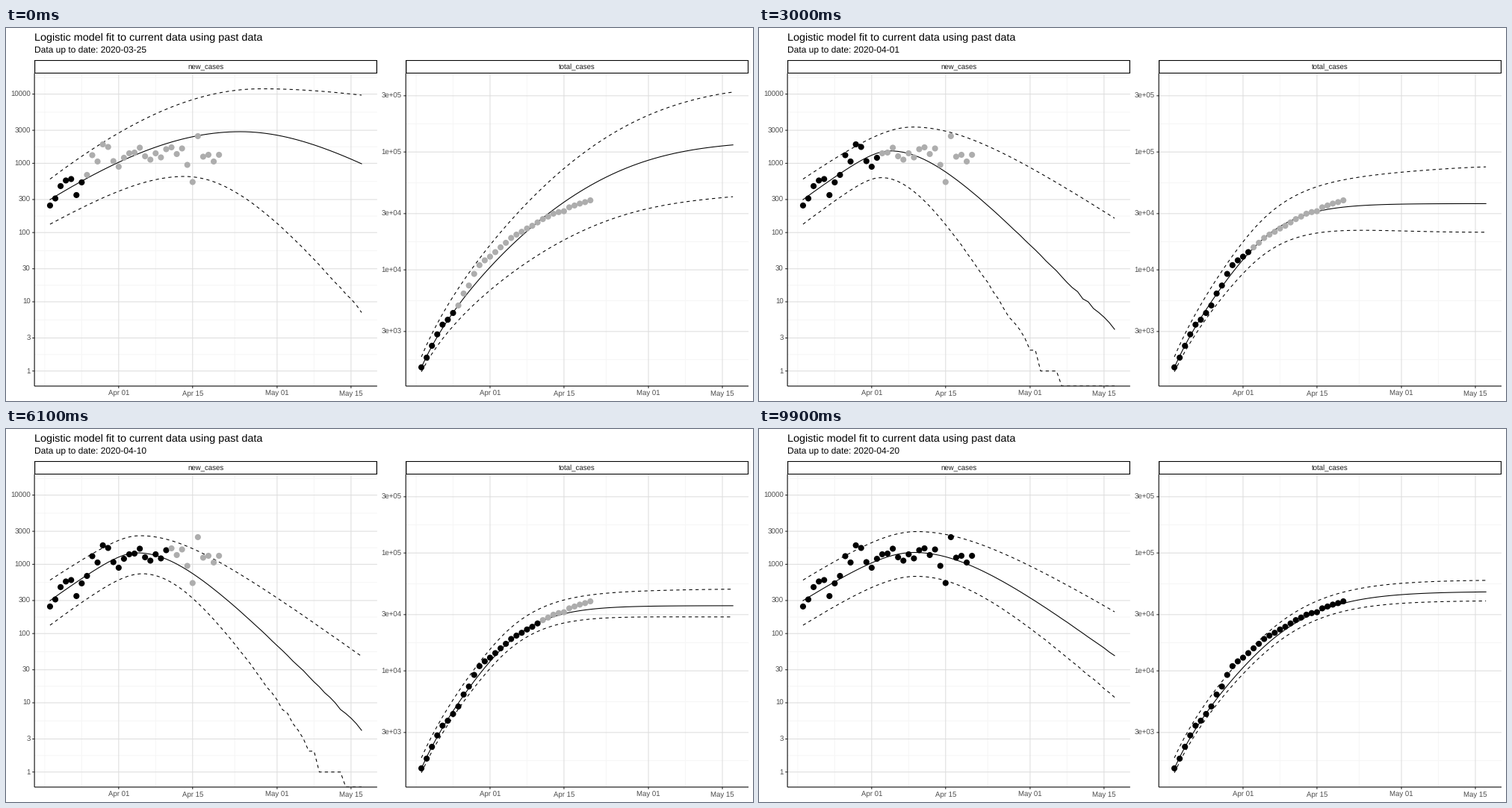
A matplotlib script that plays this animation: 1000 px wide and 500 px high, repeating every 10000 ms.

```python
import math
import numpy as np
import matplotlib.pyplot as plt
from matplotlib.animation import FuncAnimation
from matplotlib.patches import Rectangle

W, H, DPI = 1000, 500, 100
FRAMES, INTERVAL = 100, 100
STATES = 27
PT = 72 / DPI                      # points per pixel
LINE = 1.07

LEFT, WIDTH, PANEL_DX = 38.09, 458.77, 497.13
STRIP, TOP, BOTTOM = 43, 61, 480
DAYS = np.arange(60)
LAST = DAYS[-1]
DAY0 = LEFT + WIDTH / 22           # 5 % margin on both sides of the data
DAY_W = WIDTH / 1.1 / LAST

plt.rcParams.update({"font.family": "Liberation Sans", "text.hinting": "none",
                     "path.snap": False})

CASES = np.array([
    246, 311, 469, 565, 593, 348, 531, 680, 1312, 1063, 1880,
    1724, 1076, 893, 1203, 1396, 1431, 1682, 1264, 1130, 1396, 1218,
    1600, 1702, 1362, 1640, 950, 537, 2470, 1248, 1328, 1063, 1328])
FIRST_TOTAL = 1490
TOTALS = FIRST_TOTAL + np.cumsum(CASES) - CASES[0]

# Per key state: peak day, peak height and last height of each new-case curve
KEYS = [0, 4, 6, 10, 16, 20, 26]
MID = [(36, 139, 182), (21.5, 145.5, 330), (17.5, 159.5, 381), (15.5, 170, 430),
       (16.5, 166, 403), (18, 164.5, 363), (21, 165.5, 304)]
HIGH = [(40, 81.5, 90), (28, 105, 190), (23, 124.5, 237), (18.5, 141, 273),
        (17, 143, 305), (19.5, 142, 292), (21.5, 137.5, 245)]
LOW = [(25.5, 199, 381), (18.3, 187, 522), (15.3, 199, 595), (14.3, 202, 630),
       (17.5, 194, 530), (18.5, 193, 444), (21.5, 197.5, 360)]


def new_y(v):
    return 459.8 - 92.8 * np.log10(v)


def new_value(y):
    return 10 ** ((459.8 - y) / 92.8)


def tot_y(v):
    return 324.2 - 158 * (np.log10(v) - 4)


def day_x(d, dx):
    return DAY0 + DAY_W * np.asarray(d) + dx


def hump(state, keys, start):
    """Hyperbolic rise from a fixed start to a peak, then a fall to the end."""
    day, peak, end = (np.interp(state, KEYS, c) for c in zip(*keys))
    w = (day / 36) ** 1.5          # slow outbreaks have rounder peaks
    before = DAYS < day
    u = np.where(before, (day - DAYS) / day, (DAYS - day) / (LAST - day))
    bend = (np.sqrt(u * u + w * w) - w) / (math.sqrt(1 + w * w) - w)
    return peak + (np.where(before, start, end) - peak) * bend


def sigmoid_fall(state, centre, scale):
    return 1 / (1 + math.exp((state - centre) / scale))


def band(first, last, power):
    return first + (last - first) * (1 - (1 - DAYS / LAST) ** power)


def new_heights(state):
    return [hump(state, MID, 230), hump(state, HIGH, 202.5), hump(state, LOW, 263)]


def total_heights(state):
    """Running sum of the middle curve with a band that narrows over the states."""
    new = new_value(hump(state, MID, 230))
    mid = tot_y(FIRST_TOTAL + 1.09 * (np.cumsum(new) - new[0]))
    high = 15 + 60 * sigmoid_fall(state, 9, 3.5)
    low = 12 + 63 * sigmoid_fall(state, 7, 3)
    return [mid, mid - band(14, high, 1.3), mid + band(6, low, 2)]


def whole_cases(y):
    """Round to whole cases; zero has no place on the log scale."""
    v = np.round(new_value(y))
    return np.where(v > 0, new_y(np.maximum(v, 1)), np.nan)


fig = plt.figure(figsize=(W / DPI, H / DPI), dpi=DPI, facecolor="white")
ax = fig.add_axes([0, 0, 1, 1])
ax.set_xlim(0, W)
ax.set_ylim(H, 0)
ax.axis("off")


def label(x, y, s, px, color="black", ha="left"):
    return ax.text(x, y, s, fontsize=px * PT, color=color, ha=ha, va="baseline", zorder=7)


def rule(x, y, color, z=1.0):
    ax.plot(x, y, color=color, lw=LINE * PT, zorder=z, solid_capstyle="butt")


def box(x, y0, y1, **style):
    return Rectangle((x, y0), WIDTH, y1 - y0, transform=ax.transData, **style)


def panel(dx, name, y_of, ticks, minors):
    left, right = LEFT + dx, LEFT + WIDTH + dx
    for d in (-1, 6, 20, 35, 50):
        rule([day_x(d, dx)] * 2, [TOP, BOTTOM], "#f6f6f6")
    for m in minors:
        rule([left, right], [y_of(10 ** m)] * 2, "#f6f6f6")
    for d, text in ((13, "Apr 01"), (27, "Apr 15"), (43, "May 01"), (57, "May 15")):
        x = day_x(d, dx)
        rule([x, x], [TOP, BOTTOM], "#dedede", 1.5)
        rule([x, x], [BOTTOM, BOTTOM + 3], "#333333")
        label(x, 493.3, text, 9.6, "#4d4d4d", "center")
    for text in ticks:
        y = y_of(float(text))
        rule([left, right], [y, y], "#dedede", 1.5)
        rule([left - 3, left], [y, y], "#333333")
        label(left - 5.4, y + 3.4, text, 9.6, "#4d4d4d", "right")
    rule([left, left], [TOP, BOTTOM], "black", 6)
    rule([left, right], [BOTTOM, BOTTOM], "black", 6)
    strip = box(left, STRIP, TOP, fc="white", ec="black", lw=2 * LINE * PT, zorder=6)
    ax.add_patch(strip)
    strip.set_clip_path(box(left, STRIP, TOP))
    label((left + right) / 2, 55.3, name, 9.6, "#1a1a1a", "center")
    return box(left, TOP, BOTTOM)


def curves(dx, clip):
    """A solid middle line and two dashed bounds."""
    lines = []
    for style in ("-", (0, (4, 4)), (0, (4, 4))):
        line, = ax.plot(day_x(DAYS, dx), DAYS * np.nan, color="black", lw=LINE * PT,
                        ls=style, dash_capstyle="butt", zorder=3)
        line.set_clip_path(clip)
        lines.append(line)
    return lines


def dots(dx, y):
    return ax.scatter(day_x(np.arange(len(y)), dx), y, s=(8.1 * PT) ** 2,
                      linewidths=0, zorder=4)


label(38.1, 17, "Logistic model fit to current data using past data", 14.4)
subtitle = label(38.1, 34, "", 12)

new_clip = panel(0, "new_cases", new_y,
                 "1 3 10 30 100 300 1000 3000 10000".split(),
                 np.arange(9) / 2 + .2385)
tot_clip = panel(PANEL_DX, "total_cases", tot_y,
                 "3e+03 1e+04 3e+04 1e+05 3e+05".split(),
                 np.arange(5) / 2 + 3.2385)
new_lines = curves(0, new_clip)
tot_lines = curves(PANEL_DX, tot_clip)
clouds = [dots(0, new_y(CASES)), dots(PANEL_DX, tot_y(TOTALS))]

STARTS = [math.ceil((FRAMES - 1) * k / (STATES - 1) - .5) for k in range(STATES)]


def date_text(n):
    return f"2020-03-{25 + n:02d}" if n < 7 else f"2020-04-{n - 6:02d}"


def draw(frame):
    state = sum(s <= frame for s in STARTS) - 1
    # zeros touch the floor only in the first frame of each state
    floor = BOTTOM if frame == STARTS[state] else np.nan
    subtitle.set_text("Data up to date: " + date_text(frame * (STATES - 1) // (FRAMES - 1)))
    for line, y in zip(new_lines, new_heights(state)):
        y = whole_cases(y)
        line.set_ydata(np.where(np.isnan(y), floor, y))
    for line, y in zip(tot_lines, total_heights(state)):
        line.set_ydata(y)
    known = state + 7
    for cloud in clouds:
        cloud.set_facecolor(["black"] * known + ["#adadad"] * (len(CASES) - known))
    return []


anim = FuncAnimation(fig, draw, frames=FRAMES, interval=INTERVAL,
                     init_func=lambda: draw(0), repeat=True, repeat_delay=0)
plt.show()
```
